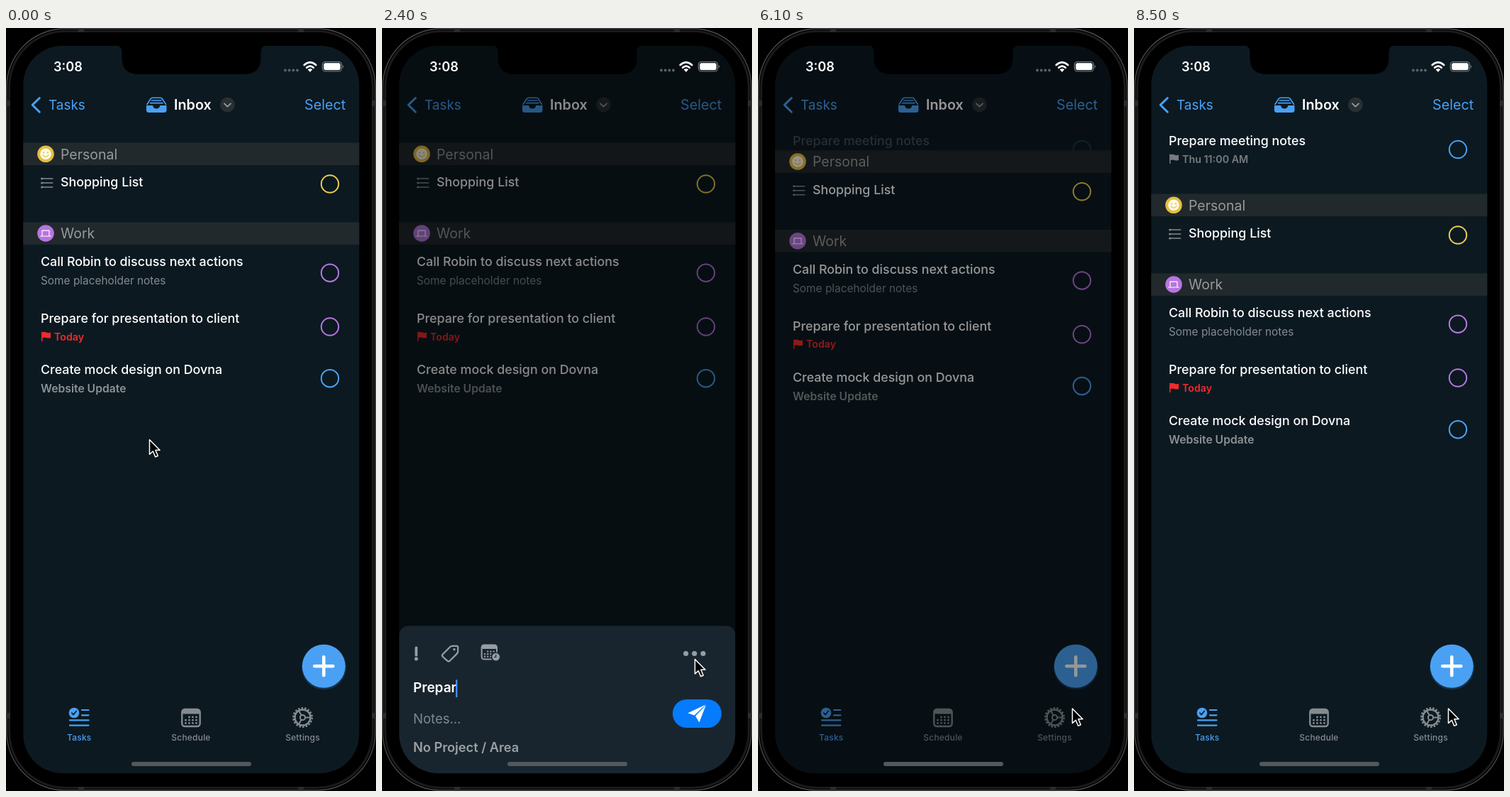
Write an HTML page that moves like this. It is 522 px wide and 1074 px high and loops after 8700 ms.

```html
<!DOCTYPE html>
<html lang="en">
<head>
<meta charset="utf-8">
<title>Quick task entry</title>
<style>
html, body { margin: 0; height: 100%; overflow: hidden; background: #000; }
svg { display: block; width: 100%; height: 100%; }
text { font-family: Inter, "Liberation Sans", sans-serif; white-space: pre; }
#day { font-variant-numeric: tabular-nums; }
</style>
</head>
<body>
<svg id="stage" viewBox="0 0 522 1074"></svg>
<script>
const BLUE = '#4aa1f4', PURPLE = '#b675e0', YELLOW = '#eccd4d', RED = '#f22a2c', GREY = '#858b8f', SOFT = '#969da3';

// Markup helpers
const text = (x, y, size, weight, fill, s, more = '') =>
  `<text x="${x}" y="${y}" font-size="${size}" font-weight="${weight}" fill="${fill}" ${more}>${s}</text>`;
const line = (d, color, width, more = '') =>
  `<path d="${d}" fill="none" stroke="${color}" stroke-width="${width}" stroke-linecap="round" stroke-linejoin="round" ${more}/>`;
const shape = (d, fill) => `<path d="${d}" fill="${fill}"/>`;
const disc = (x, y, r, fill) => `<circle cx="${x}" cy="${y}" r="${r}" fill="${fill}"/>`;
const box = (x, y, w, h, r, fill, more = '') =>
  `<rect x="${x}" y="${y}" width="${w}" height="${h}" rx="${r}" fill="${fill}" ${more}/>`;
const group = (id, s) => `<g id="${id}">${s}</g>`;
const at = (x, y, s, scale = 1) => `<g transform="translate(${x} ${y}) scale(${scale})">${s}</g>`;
const ring = (y, color) =>
  `<circle cx="457" cy="${y}" r="12.2" fill="none" stroke="${color}" stroke-width="2"/>`;
const title = (y, s, x = 49) => text(x, y, 17.85, 500, '#fff', s);
const flag = (x, y, color, scale = 1) => at(x, y,
  line('M.8 0.8V13', color, 1.5) + shape('M1 1Q4-.6 7 1T13 1V8.5Q10 9.6 7 8.5T1 8.5Z', color), scale);
const band = (y, s) => box(24, y, 475, 31.5, 0, '#22292c') + text(77, y + 23, 19.5, 400, '#969a9c', s);

const calendar = (color, cols, rows) => {
  let s = `<rect x="-12.7" y="-12" width="25.4" height="24" rx="4" fill="none" stroke="${color}" stroke-width="2.4"/>` +
    box(-12.5, -12, 25, 6.5, 2, color);
  for (let r = 0; r < rows; r++)
    for (let c = 0; c < cols; c++)
      if (r + c) s += disc(-7.5 + c * 5, -1 + r * 4.2, 1.4, color);
  return s;
};

const status = text(67, 61, 18.2, 600, '#fff', '3:08') +
  [394, 399.7, 405.4, 411].map(x => disc(x, 59.5, 1.9, '#596269')).join('') +
  line('M420.8 52Q429 44.8 437.2 52', '#fff', 2.8) +
  line('M424.2 55.8Q429 51.4 433.8 55.8', '#fff', 2.7) +
  shape('M425.7 58.6Q429 55.8 432.3 58.6L429 62Z', '#fff') +
  '<rect x="446.5" y="47.5" width="27" height="13.5" rx="4.2" fill="none" stroke="#7b8285" stroke-width="1.2"/>' +
  box(448.3, 49.3, 23.4, 9.9, 2.6, '#fff') + shape('M475 52Q477.4 54.2 475 56.6Z', '#7b8285');

const nav = line('M47.3 98.5L37.2 108.3L47.3 118.2', BLUE, 3) +
  text(60, 115.3, 18.9, 400, BLUE, 'Tasks') +
  shape('M198 109H207Q208 113.5 212.2 113.5T217.4 109H226.5V115.5Q226.5 119 223 119H201.5Q198 119 198 115.5Z', BLUE) +
  line('M199 107.5L204.2 99.5Q205 98.3 206.5 98.3H218Q219.5 98.3 220.3 99.5L225.5 107.5M205.5 102H219M203.5 105.6H221', BLUE, 1.6) +
  text(237, 115.3, 19.8, 600, '#fff', 'Inbox') +
  disc(312.5, 108, 10.4, '#293034') + line('M308 106.4L312.5 110.6L317 106.4', '#969a9c', 1.9) +
  text(421, 115.3, 19.8, 400, BLUE, 'Select');

const newTask = box(30, 135, 462, 72, 9, '#b6a85f', 'id="glow"') +
  title(165.3, 'Prepare meeting notes') + flag(50, 177.5, '#777c80') +
  text(68, 189.7, 14.3, 600, '#777c80', 'Thu 11:00 AM') + ring(171, BLUE);

const list = band(161.5, 'Personal') + disc(56, 177.3, 11.8, '#e3bf42') + disc(56, 177.3, 7.8, '#fffbe8') +
  disc(53.2, 175.4, 1.1, '#e3bf42') + disc(58.8, 175.4, 1.1, '#e3bf42') +
  line('M52 178.8Q56 183.8 60 178.8', '#e3bf42', 1.3) +
  [212, 218, 224].map(y => disc(50.6, y, 1.5, GREY) + line(`M52 ${y}H65.8`, GREY, 1.3)).join('') +
  title(223.3, 'Shopping List', 77) + ring(219.5, YELLOW) +
  band(273.3, 'Work') + disc(56, 289, 11.8, PURPLE) +
  line('M51 292V285.2H61V292M48.6 293H63.4', '#fff', 1.2) +
  title(335.3, 'Call Robin to discuss next actions') +
  text(49, 361, 15.4, 400, '#858b8f', 'Some placeholder notes') + ring(344.7, PURPLE) +
  title(415.3, 'Prepare for presentation to client') + flag(50, 427.5, RED) +
  text(68, 439.7, 14.2, 600, RED, 'Today') + ring(420.5, PURPLE) +
  title(487.3, 'Create mock design on Dovna') +
  text(49, 513, 15.7, 600, '#8c9295', 'Website Update') + ring(493.2, BLUE);

const tab = (x, color, s) => text(x, 1002.6, 12, 500, color, s, 'text-anchor="middle" letter-spacing=".2"');
const gear = `<circle r="13.2" fill="none" stroke="${GREY}" stroke-width="2.6" stroke-dasharray="2.5 2.11"/>` +
  `<circle r="11" fill="none" stroke="${GREY}" stroke-width="2.4"/><circle r="3.6" fill="none" stroke="${GREY}" stroke-width="2"/>` +
  line('M4 0H10M-2 -3.4L-5.2 -9M-2 3.4L-5.2 9', GREY, 2);
const tabs = disc(96, 964, 7.3, BLUE) + line('M92.8 964.2L95.2 966.6L99.2 961.4', '#0c1921', 1.7) +
  line('M107 960H116.5M107 967.3H116.5M90 974.4H116.5M90 981.6H116.5', BLUE, 2.2) + tab(103.3, BLUE, 'Tasks') +
  at(261, 971, calendar(GREY, 4, 3)) + tab(261, GREY, 'Schedule') +
  at(418.5, 970.5, gear) + tab(418.5, GREY, 'Settings') +
  disc(448.5, 900, 31.5, '#16324b') + disc(448.3, 898.3, 30.5, BLUE) +
  line('M448.3 885.3V911.3M435.3 898.3H461.3', '#fff', 4.6);

const tag = line('M-10 1.5L-.5 -8Q1 -9.6 3 -9.6H8.4Q10 -9.6 10 -8V-2.8Q10 -.8 8.6 .6L-.6 9.8Q-2.4 11.2 -4 9.6L-10 4.2Q-11.2 2.8 -10 1.5Z', SOFT, 2.1) +
  disc(5.2, -5, 1.6, SOFT);
const tools = line('M48.3 -8V2.2', SOFT, 3.8) + disc(48.3, 7.6, 2.5, SOFT) + at(96.3, -.3, tag, 1.08) +
  [428.7, 440.8, 453].map(x => disc(x, 0, 3.6, SOFT)).join('');
const dueIcon = at(151.3, -2, calendar(SOFT, 4, 3), .84) + disc(160.7, 4.7, 7, '#19252e') +
  disc(160.7, 4.7, 5.4, SOFT) + line('M160.7 1.7V5H158.6', '#19252e', 1.2);
const sheet = box(24, 0, 475, 260, 14, '#19252e', 'id="panel"') + group('tools', tools) + group('due', dueIcon) +
  group('when', flag(141.5, -9, '#ff3860', 1.38) + text(172, 6, 17.2, 600, '#ff3860', '', 'id="day"')) +
  group('clear', disc(0, 0, 10.8, '#929a9f') + line('M-3.4 -3.4L3.4 3.4M3.4 -3.4L-3.4 3.4', '#19252e', 2.2)) +
  box(0, 0, 0, 22.5, 0, '#4b2b31', 'id="mark1"') + box(44, 918, 0, 22.5, 0, '#4b2b31', 'id="mark2"') +
  text(44, 0, 19, 600, '#fff', '', 'id="line1"') + text(44, 935.3, 19, 600, '#fff', '', 'id="line2"') +
  box(0, 0, 2.2, 25, 1, '#4797f5', 'id="caret"') +
  text(44, 979, 18.5, 400, '#7f888e', 'Notes...', 'id="notes"') +
  text(44, 1019.2, 18.2, 600, '#99a1a6', 'No Project / Area') +
  group('send', box(410, -20, 69, 40, 20, '#6b6c6e', 'id="pill"') +
    shape('M456.5 -12.5L431.5 -.8L440.6 2.6ZM457 -12L442.2 3.6L447.6 12.5Z', '#fff'));

const frame = '<rect x="1" y="1" width="520" height="1072" rx="82" fill="none" stroke="#49494b" stroke-width="1.4"/>' +
  '<rect x="4.5" y="4.5" width="513" height="1065" rx="79" fill="none" stroke="#1b1b1d" stroke-width="3"/>' +
  [[102, 1, 8, 5], [412, 1, 8, 5], [102, 1068, 8, 5], [412, 1068, 8, 5],
   [1, 102, 5, 8], [516, 102, 5, 8], [1, 964, 5, 8], [516, 964, 5, 8]]
    .map(([x, y, w, h]) => box(x, y, w, h, 0, '#2b2b2d')).join('');

document.getElementById('stage').innerHTML =
  '<clipPath id="screen"><rect x="24.3" y="25" width="474" height="1024" rx="55"/></clipPath>' + frame +
  `<g clip-path="url(#screen)">${box(24, 25, 475, 1025, 0, '#0c1921')}` +
  group('fresh', newTask) + group('list', list) + nav + tabs +
  box(24, 25, 475, 1025, 0, '#000', 'id="dim"') + group('sheet', sheet) +
  shape('M155 24Q163.5 25.5 163.5 34V42Q163.5 65 187 65H336Q359.5 65 359.5 42V34Q359.5 25.5 368 24Z', '#000') +
  status + box(177, 1033, 169, 6, 3, '#52585b') + '</g>' +
  '<path id="cursor" d="M0 0V20.6L4.8 16.2L8.2 24.2L11.8 22.7L8.4 14.8H14.6Z" fill="#000" stroke="#fff" stroke-width="1.5" stroke-linejoin="round"/>';

const $ = {};
for (const el of document.querySelectorAll('#stage [id]')) $[el.id] = el;
const set = (id, attrs) => { for (const k in attrs) $[id].setAttribute(k, attrs[k]); };
const move = (id, x, y) => set(id, { transform: `translate(${x} ${y})` });

const ramp = (t, a, b) => Math.min(1, Math.max(0, (t - a) / (b - a)));
const smooth = (t, a, b) => { const p = ramp(t, a, b); return p * p * (3 - 2 * p); };
const settle = (t, a, b) => 1 - (1 - ramp(t, a, b)) ** 3;

const PHRASE = 'Prepare meeting notes due thurs 11am', DUE = 22, WRAP = 32;

function typed(t) {
  if (t < 2000) return 0;
  const n = t < 2900 ? 1 + (t - 2000) * 13 / 900 : 14 + (t - 2900) / 100;
  return Math.min(PHRASE.length, Math.floor(n));
}

function drawSheet(t) {
  const n = typed(t), dated = n >= 29, wrapped = n > WRAP;
  const empty = 1 - settle(t, 1100, 1300);
  const due = settle(t, 4300, 4600), two = settle(t, 4700, 4900);
  const top = 841.5 + 15 * empty - 20 * due - 23 * two;
  const row = top + 39 + 10 * due, base = 935.3 + 15 * empty - 23 * two;

  set('panel', { y: top });
  move('tools', 0, row);
  move('due', 0, top + 39 - 3 * due);
  move('when', 0, top + 62);
  move('send', 0, 965 + 7.5 * empty - 11.5 * two);
  set('when', { opacity: due });
  set('clear', { opacity: due });
  set('notes', { opacity: 1 - empty });
  set('pill', { fill: n ? '#067bfd' : '#6b6c6e' });

  $.day.textContent = n === PHRASE.length ? 'Thu  11:00\u200aAM' : 'Thu';
  move('clear', 194.5 + $.day.getComputedTextLength(), row);

  $.line1.textContent = PHRASE.slice(0, Math.min(n, WRAP));
  $.line2.textContent = PHRASE.slice(WRAP, Math.max(n, WRAP));
  set('line1', { y: base });
  const w1 = n ? $.line1.getComputedTextLength() : 0;
  const w2 = wrapped ? $.line2.getComputedTextLength() : 0;
  const start = dated ? $.line1.getSubStringLength(0, DUE) : 0;
  set('mark1', { x: 44 + start, y: base - 17.5, width: dated ? w1 - start : 0 });
  set('mark2', { width: w2 });
  set('caret', { x: wrapped ? 44 + w2 : 43 + w1, y: (wrapped ? 935.3 : base) - 18 });
}

function draw(t) {
  const reach = smooth(t, 300, 700), send = smooth(t, 5300, 5600);
  move('cursor', 202.5 + 239 * reach + 2 * send, 579.5 + 309 * reach + 69.5 * send);

  const hidden = 1 - settle(t, 700, 1050) + smooth(t, 5600, 5900);
  move('sheet', 0, 290 * hidden);
  set('dim', { opacity: .46 * (ramp(t, 700, 1000) - ramp(t, 6050, 6500)) });
  drawSheet(t);

  move('list', 0, 72 * smooth(t, 5910, 6690));
  set('fresh', { opacity: ramp(t, 6000, 6450) });
  set('glow', { opacity: ramp(t, 6700, 7000) - ramp(t, 8000, 8400) });
}

function tick() {
  draw(Math.floor(performance.now() % 8700 / 100) * 100);
  requestAnimationFrame(tick);
}
tick();
</script>
</body>
</html>
```
